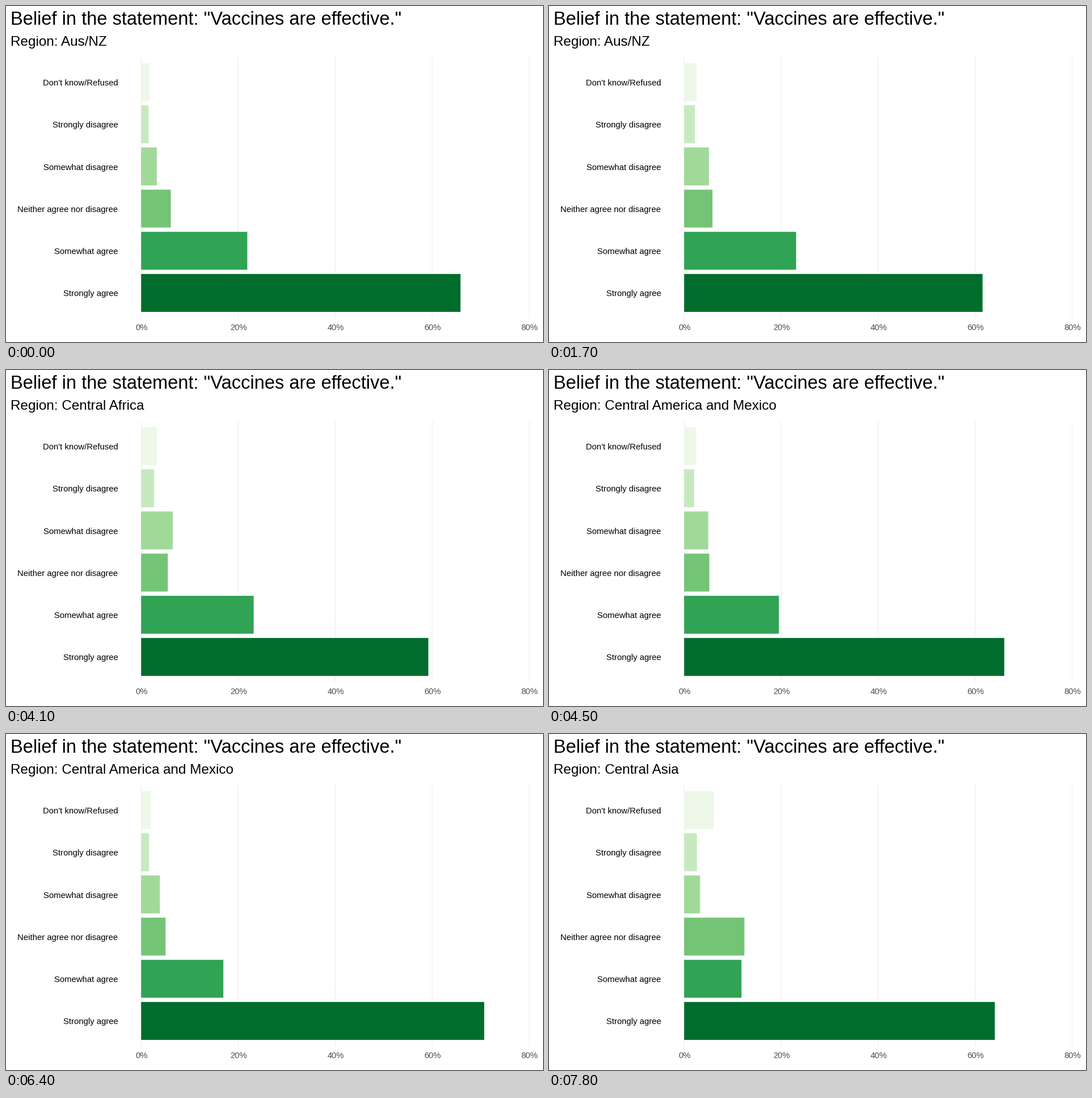
These frames come from a looping animation (947x592 px, 8000 ms). A matplotlib script:

```python
import matplotlib.pyplot as plt
from matplotlib.animation import FuncAnimation
from matplotlib.patches import Rectangle

W, H, DPI = 947, 592, 128
FRAMES, INTERVAL = 80, 100
FIRST_MOVE, MOVE, PERIOD = 8, 18, 27  # in frames

X0, X_STEP = 238.3, 171.1  # 0% line and the distance to the next one
ROW_TOP, ROW_STEP, BAR_HEIGHT = 100.65, 74.3, 66.8

ANSWERS = ["Don't know/Refused", "Strongly disagree", "Somewhat disagree",
           "Neither agree nor disagree", "Somewhat agree", "Strongly agree"]
COLORS = ["#EDF8E9", "#C7E9C0", "#A1D99B", "#74C476", "#31A354", "#006D2C"]

# Right edge of each bar in pixels, per region
REGIONS = [
    ("Aus/NZ", [253.4, 251.5, 265.9, 290.6, 425.5, 801.5]),
    ("Central Africa", [267.8, 262.9, 298.0, 286.1, 446.0, 727.6]),
    ("Central America and Mexico", [255.4, 252.3, 271.4, 281.0, 383.5, 843.6]),
    ("Central Asia", [290.8, 260.9, 266.4, 344.9, 339.2, 785.9]),
]

plt.rcParams["font.family"] = "Liberation Sans"
fig = plt.figure(figsize=(W / DPI, H / DPI), dpi=DPI, facecolor="white")
ax = fig.add_axes([0, 0, 1, 1])
ax.set_xlim(0, W)
ax.set_ylim(H, 0)
ax.axis("off")


def label(x, y, text, px, color="black", ha="left"):
    return ax.text(x, y, text, size=px * 72 / DPI, color=color,
                   ha=ha, va="baseline")


def box(x, y, w, h, color):
    return ax.add_patch(Rectangle((x, y), w, h, facecolor=color,
                                  linewidth=0, snap=False))


def ease(t):
    return 4 * t ** 3 if t < 0.5 else 1 - 4 * (1 - t) ** 3


label(8, 33, 'Belief in the statement: "Vaccines are effective."', 32.6)
subtitle = label(8, 70, "", 24.3)

for i in range(5):
    x = int(X0 + i * X_STEP)
    box(x, 90, 1, 460, "#EBEBEB")
    label(x + 1.2, 571, f"{20 * i}%", 14.8, "#4D4D4D", "center")

bars = []
for i, (answer, color) in enumerate(zip(ANSWERS, COLORS)):
    top = ROW_TOP + i * ROW_STEP
    bars.append(box(X0, top, 0, BAR_HEIGHT, color))
    label(197.5, round(top + BAR_HEIGHT / 2 + 5.9), answer, 14.85, ha="right")


def update(frame):
    step, within = divmod(max(0, frame - FIRST_MOVE), PERIOD)
    t = min(within / MOVE, 1)
    (name, start), (next_name, end) = REGIONS[step:step + 2]
    subtitle.set_text("Region: " + (next_name if t > 0.5 else name))
    for bar, a, b in zip(bars, start, end):
        bar.set_width(a + (b - a) * ease(t) - X0)
    return [subtitle, *bars]


anim = FuncAnimation(fig, update, frames=FRAMES, interval=INTERVAL,
                     repeat=True, repeat_delay=0, blit=False)
plt.show()
```
